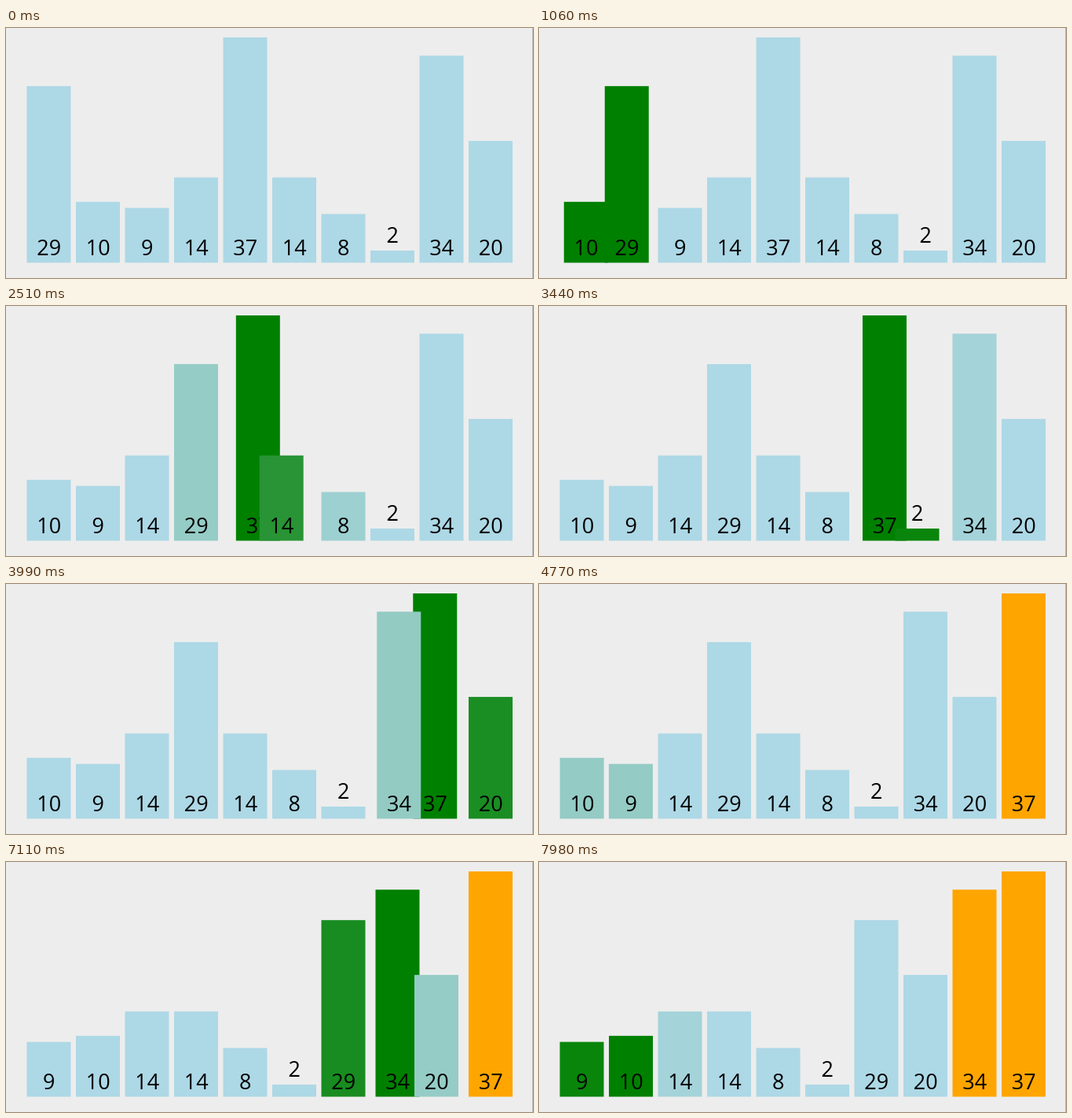
Write an HTML page that moves like this. It is 671x319 px and loops after 8000 ms.

```html
<!DOCTYPE html>
<html lang="en">
<head>
<meta charset="utf-8">
<title>Bubble sort</title>
<style>
  html, body { margin: 0; width: 100%; height: 100%; overflow: hidden; background: #ededed; }
  svg { display: block; }
  text { font: 27px "Open Sans", "Noto Sans", sans-serif; text-anchor: middle; }
</style>
</head>
<body>
<svg id="stage" width="671" height="319"></svg>
<script>
const LOOP = 8000, DURATION = 250;
const VALUES = [29, 10, 9, 14, 37, 14, 8, 2, 34, 20];
const BLUE = [173, 216, 230], GREEN = [0, 128, 0], ORANGE = [255, 165, 0];
const LEFT = 26.5, PITCH = 62.5, WIDTH = 56, BOTTOM = 299.5, UNIT = 7.77;

// Start time of each sorting state, in order
const TIMES = [
  465, 880, 1065, 1430, 1503, 1885, 1960, 2190, 2350, 2440, 2840, 2915, 3304, 3382, 3745, 3825, 4230, 4250,
  4670, 4752, 5150, 5170, 5610, 5640, 5708, 6105, 6165, 6525, 6605, 6983, 7037, 7465,
  7475, 7922
];

// Every state lists [slot, r, g, b] for each bar
function* bubbleSort() {
  const order = VALUES.map((_, i) => i);
  const state = (active, sorted) => VALUES.map((_, i) => {
    const slot = order.indexOf(i);
    const color = slot >= sorted ? ORANGE : active.includes(slot) ? GREEN : BLUE;
    return [slot, ...color];
  });
  yield state([], order.length);
  for (let end = order.length; end > 1; end--) {
    for (let j = 0; j < end - 1; j++) {
      yield state([j, j + 1], end);
      if (VALUES[order[j]] > VALUES[order[j + 1]]) {
        [order[j], order[j + 1]] = [order[j + 1], order[j]];
        yield state([j, j + 1], end);
      }
    }
    yield state([], end - 1);
  }
}

const ease = p => p < 0.5 ? 4 * p ** 3 : 1 - 4 * (1 - p) ** 3;

function blend(from, to, elapsed) {
  const k = ease(Math.min(1, elapsed / DURATION));
  return from.map((bar, i) => bar.map((v, n) => v + (to[i][n] - v) * k));
}

// A new state takes over from wherever the previous transition has got to
const states = bubbleSort();
const first = states.next().value;
const moves = [{ time: 0, from: first, to: first }];
for (const time of TIMES) {
  const last = moves[moves.length - 1];
  moves.push({ time, from: blend(last.from, last.to, time - last.time), to: states.next().value });
}

const stage = document.getElementById("stage");
function add(parent, tag, attrs) {
  const el = document.createElementNS("http://www.w3.org/2000/svg", tag);
  for (const name in attrs) el.setAttribute(name, attrs[name]);
  return parent.appendChild(el);
}

const bars = VALUES.map(value => {
  const group = add(stage, "g");
  const height = value * UNIT;
  const rect = add(group, "rect", { y: BOTTOM - height, width: WIDTH, height });
  const label = add(group, "text", { x: WIDTH / 2 + 0.3, y: height < 25 ? 274 : 290 });
  label.textContent = value;
  return { group, rect };
});
add(stage, "rect", { x: 670, width: 1, height: 319, fill: "#b4b4b4" });

function draw(now) {
  const t = now % LOOP;
  const move = moves.findLast(m => m.time <= t);
  blend(move.from, move.to, t - move.time).forEach(([slot, ...rgb], i) => {
    bars[i].group.setAttribute("transform", `translate(${LEFT + slot * PITCH} 0)`);
    bars[i].rect.setAttribute("fill", `rgb(${rgb.map(Math.round)})`);
  });
}

const start = performance.now();
function tick() {
  draw(performance.now() - start);
  requestAnimationFrame(tick);
}
tick();
</script>
</body>
</html>
```
